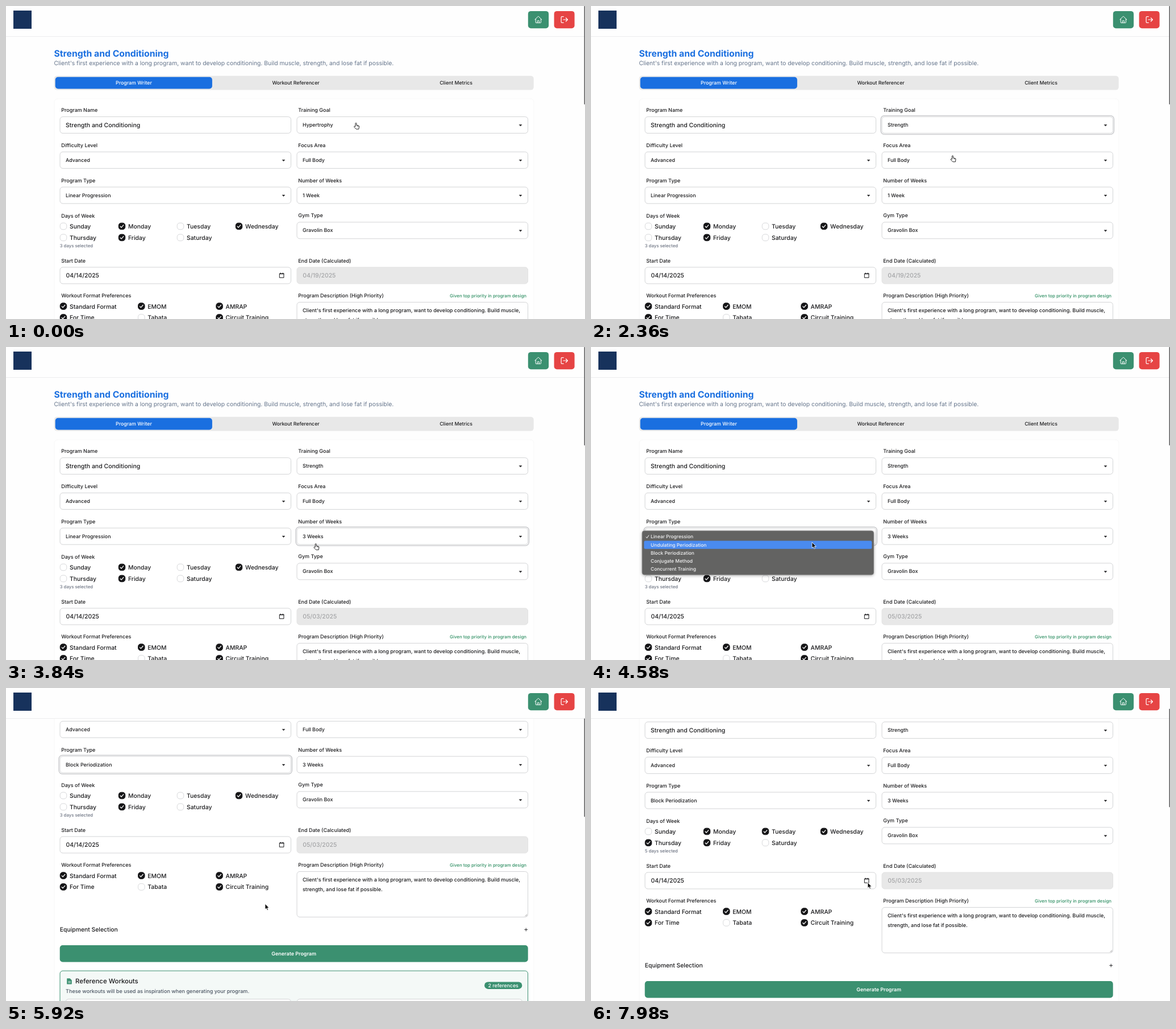
Recreate the animation shown at these times as an HTML page. Size 1019 by 550 pixels, loop 8 s.

```html
<!DOCTYPE html>
<html lang="en">
<head>
<meta charset="utf-8">
<title>Program Writer</title>
<style>
html, body { margin: 0; width: 100%; height: 100%; overflow: hidden; background: #fefefe; }
svg { display: block; width: 100%; height: 100%; font-family: Inter, "Open Sans", sans-serif; font-weight: 450; text-rendering: geometricPrecision; }
.menu { filter: drop-shadow(0 1.5px 2.5px rgba(0, 0, 0, .35)); }
</style>
</head>
<body>
<svg id="stage" viewBox="0 0 1019 550"></svg>
<script>
const LOOP = 8000, STEP = 148;
const INK = '#1b1b1d', LINE = '#d3d4d6', GREEN = '#3b9070', BLUE = '#1a6fe0', GREY = '#6b7280';
const LEFT = 95, RIGHT = 512, WIDTH = 406.5;
const SUMMARY = ["Client's first experience with a long program, want to develop conditioning. Build muscle,",
  'strength, and lose fat if possible.'];
const GOALS = ['Strength', 'Endurance', 'Hypertrophy', 'Power', 'Skill Development', 'Conditioning'];
const WEEKS = ['1 Week', '2 Weeks', '3 Weeks', '4 Weeks', '5 Weeks', '6 Weeks'];
const TYPES = ['Linear Progression', 'Undulating Periodization', 'Block Periodization', 'Conjugate Method', 'Concurrent Training'];
const DAYS = ['Sunday', 'Monday', 'Tuesday', 'Wednesday', 'Thursday', 'Friday', 'Saturday'];
const FORMATS = ['Standard Format', 'EMOM', 'AMRAP', 'For Time', 'Tabata', 'Circuit Training'];

// Keys: step, then values
const CURSOR = [[0, 616, 205.5], [2, 602, 212], [4, 628, 221], [5, 640, 214], [6, 640, 214], [7, 640, 209],
  [9, 639, 206], [11, 633, 189], [13, 634, 180], [14, 634, 180], [15, 634, 200], [17, 639, 326], [18, 639, 326],
  [19, 640, 331], [21, 641, 346.5], [23, 641, 361], [24, 641, 361], [25, 622, 352], [28, 392, 333],
  [31, 389, 343.5], [32, 390, 358], [34, 395, 361], [38, 456, 379], [40, 456, 379.5], [43, 456, 379.5],
  [45, 332, 250], [46, 332, 250], [48, 133, 272], [51, 133, 272], [54, 487, 342]];
const SCROLL = [[0, 0], [38, 0], [39, 80], [40, 198], [41, 198], [42, 160], [43, 138], [44, 135]];
const HAND_SPANS = [[0, 6], [15, 18], [25, 27], [45, 46], [49, 51]];

function sample(keys, step) {
  const i = keys.findIndex(k => k[0] >= step);
  if (i < 0) return keys[keys.length - 1].slice(1);
  if (keys[i][0] === step) return keys[i].slice(1);
  const a = keys[i - 1], b = keys[i], u = (step - a[0]) / (b[0] - a[0]);
  return a.slice(1).map((v, n) => v + (b[n + 1] - v) * u);
}

const text = (x, mid, str, size, fill = INK, extra = '') =>
  `<text x="${x}" y="${mid + size * .36}" font-size="${size}" fill="${fill}" ${extra}>${str}</text>`;
const rect = (x, y, w, h, r, fill, extra = '') =>
  `<rect x="${x}" y="${y}" width="${w}" height="${h}" rx="${r}" fill="${fill}" ${extra}/>`;
const path = (d, stroke, width, fill = 'none') =>
  `<path d="${d}" stroke="${stroke}" stroke-width="${width}" fill="${fill}" stroke-linecap="round" stroke-linejoin="round"/>`;
const move = (x, y, body) => `<g transform="translate(${x} ${y})">${body}</g>`;
const outline = `stroke="${LINE}"`;
const centered = weight => `text-anchor="middle" font-weight="${weight}"`;

const label = (x, y, str) => text(x + 2.2, y, str, 8.97);
const box = (x, y, h = 29) => rect(x, y, WIDTH, h, 5, '#fff', outline);

function select(x, row, name, value, focused) {
  const y = 194.6 + row * 61.75;
  return label(x, y - 11.6, name) + box(x, y) +
    (focused ? rect(x - 2, y - 2, WIDTH + 4, 33, 6.5, 'none', 'stroke="#c6c7ca" stroke-width="1.3"') : '') +
    text(x + 10, y + 14.4, value, 8.9) +
    move(x + 393.6, y + 14, path('M-2.2 0H2.2L0 2.3Z', INK, .5, INK));
}

const checkbox = (x, y, name, on) =>
  rect(x - 5.8, y - 5.8, 11.6, 11.6, 4.6, on ? '#151517' : '#fff', `stroke="${on ? '#151517' : LINE}" stroke-width=".9"`) +
  (on ? move(x, y, path('M-2.8 .3L-.9 2.2L2.8 -2.1', '#fff', 1.3)) : '') +
  text(x + 11, y + .2, name, 10.4);

const checks = (names, perRow, pitch, y, isOn) => names.map((name, i) =>
  checkbox(101 + i % perRow * pitch, y + Math.floor(i / perRow) * 19.9, name, isOn(name))).join('');

function menu(x, y, items, chosen, active) {
  const rows = items.map((item, i) => {
    const mid = y + 10.4 + i * 14.2;
    return (i === active ? rect(x + 3.3, mid - 7.1, 401, 14.2, 2.5, '#4a8bf0') : '') +
      (i === chosen ? move(x + 9.3, mid, path('M-2.2 .5L-.8 2.4L2.3 -2.4', '#fff', 1)) : '') +
      text(x + 15, mid, item, 8.4, '#f4f4f4');
  });
  return '<g class="menu">' + rect(x, y, 407.5, items.length * 14.2 + 6.2, 4, '#636362', 'stroke="#858585" stroke-width=".7"') + '</g>' + rows.join('');
}

function form(step) {
  const days = ['Monday', 'Wednesday', 'Friday'];
  if (step >= 46) days.push('Tuesday');
  if (step >= 51) days.push('Thursday');
  const endDate = step < 25 ? '04/19/2025' : '05/03/2025';
  return rect(85, 163, 844, 900, 6, '#fff', 'stroke="#f8f8f8"') +
    text(84.5, 83, 'Strength and Conditioning', 15.75, BLUE, 'font-weight="700"') +
    text(84.5, 100.5, SUMMARY.join(' '), 10.37, '#64748b', 'font-weight="400"') +
    rect(84.7, 122.8, 844, 24.8, 5, '#e8e8e8') + rect(86.7, 124.8, 276.2, 20.6, 5, BLUE) +
    text(225, 135, 'Program Writer', 8.8, '#fff', centered(450)) +
    text(510, 135, 'Workout Referencer', 8.7, INK, centered(500)) +
    text(792, 135, 'Client Metrics', 8.7, INK, centered(500)) +

    label(LEFT, 183, 'Program Name') + box(LEFT, 194.6) + text(105, 209.2, 'Strength and Conditioning', 10.5) +
    select(RIGHT, 0, 'Training Goal', GOALS[step < 15 ? 2 : 0], step >= 7 && step < 19) +
    select(LEFT, 1, 'Difficulty Level', 'Advanced') + select(RIGHT, 1, 'Focus Area', 'Full Body') +
    select(LEFT, 2, 'Program Type', TYPES[step < 39 ? 0 : 2], step >= 28 && step < 46) +
    select(RIGHT, 2, 'Number of Weeks', WEEKS[step < 25 ? 0 : 2], step >= 19 && step < 28) +
    select(RIGHT, 3, 'Gym Type', 'Gravolin Box') +

    label(LEFT, 368.3, 'Days of Week') + checks(DAYS, 4, 103, 387, d => days.includes(d)) +
    text(94.7, 421.5, days.length + ' days selected', 7.75, GREY) +

    label(LEFT, 447.4, 'Start Date') + box(LEFT, 459) + text(105.5, 473.5, '04/14/2025', 10.45) +
    move(485.3, 473.6, path('M-3.6 -3.4H3.6V3.8H-3.6Z', INK, 1) + path('M-3.6 -2.9H3.6M-2 -4.4V-3M2 -4.4V-3', INK, 1.2)) +
    label(RIGHT, 447.4, 'End Date (Calculated)') + rect(RIGHT, 459, WIDTH, 29, 5, '#e8e8e8', 'stroke="#e2e2e2"') +
    text(522.3, 473.5, endDate, 10.45, '#a3a4a6') +

    label(LEFT, 509, 'Workout Format Preferences') + checks(FORMATS, 3, 137.3, 527.6, f => f !== 'Tabata') +
    label(RIGHT, 509, 'Program Description (High Priority)') +
    text(916, 509, 'Given top priority in program design', 7.85, '#2f8f63', 'text-anchor="end"') +
    box(RIGHT, 520.5, 80) + SUMMARY.map((line, i) => text(522, 534.3 + i * 17.3, line, 9.03)).join('') +
    path('M913.5 599L917 595.5M915.5 599L917 597.5', '#777', .6) +

    text(94.7, 622.5, 'Equipment Selection', 10.4) + path('M912.7 622.6H917.7M915.2 620.1V625.1', INK, .9) +
    rect(94.7, 650, 824, 29.5, 5, GREEN) + text(506.7, 664.6, 'Generate Program', 8.95, '#fff', centered(600)) +

    rect(95, 695, 823.5, 300, 5, '#f4f9f7', `stroke="${GREEN}"`) +
    move(107.5, 708.3, path('M.4 .4H5L7.8 3.2V9.8H.4Z', GREEN, .8, GREEN) + path('M2.2 5.4H6M2.2 7.5H6', '#fff', .8)) +
    text(122, 713.3, 'Reference Workouts', 11.4, INK, 'font-weight="500"') +
    text(105, 730.5, 'These workouts will be used as inspiration when generating your program.', 9.08, '#4b5563') +
    rect(842, 714.5, 66.3, 12.4, 6.2, GREEN) + text(875.2, 720.7, '2 references', 8.85, '#fff', centered(450)) +
    rect(105, 744.7, 396.5, 90, 5, '#fff', outline) + rect(512, 744.7, 396.5, 90, 5, '#fff', outline);
}

function openMenu(step, y) {
  const row = (top, count) => Math.max(0, Math.min(count - 1, Math.floor((y - top - 2.5) / 14.2)));
  if (step >= 7 && step < 15) return menu(507, 171, GOALS, 2, row(171, 6));
  if (step >= 19 && step < 25) return menu(507, 323, WEEKS, 0, row(323, 6));
  if (step >= 28 && step < 35) return menu(90, 323, TYPES, 0, row(323, 5));
  return '';
}

const header = rect(0, 0, 1019, 53.5, 0, '#fefefe') + rect(0, 53, 1019, 1, 0, '#ededee') +
  rect(13, 8, 32, 32, 0, '#17325c') +
  rect(918.8, 8.9, 36.3, 30.4, 5, GREEN) + rect(964.6, 8.9, 36, 30.4, 5, '#e64444') +
  move(936.8, 24, path('M-6 0L-.5 -5.6Q0 -6 .5 -5.6L6 0M-4.6 -1.3V4.9Q-4.6 5.6 -3.9 5.6H3.9Q4.6 5.6 4.6 4.9V-1.3M-1.5 5.5V1.9H1.5V5.5', '#fff', 1)) +
  move(982.7, 24, path('M-1.5 -5.3H-4.2Q-5.6 -5.3 -5.6 -3.9V3.9Q-5.6 5.3 -4.2 5.3H-1.5M-2 0H5.6M2.7 -3L5.7 0L2.7 3', '#fff', 1.2));

const arrow = path('M0 0V9.5L2.2 7.5L3.7 11L5.4 10.3L3.9 7H6.8Z', '#fff', .8, '#000');
const hand = path('M-1.1 6V1a1 1 0 0 1 2 0V4L4.4 4.7Q5.7 5.1 5.5 6.5L4.8 10.8H.3L-3.3 7.1Q-3.7 5.6 -2.3 5.6Z', '#111', .9, '#fff') +
  path('M2.3 4.6V6M4 5V6.2', '#111', .6);

function draw(step) {
  const [x, y] = sample(CURSOR, step), [scroll] = sample(SCROLL, step);
  const isHand = HAND_SPANS.some(([from, to]) => step >= from && step <= to);
  stage.innerHTML = move(0, -scroll, form(step)) + header + openMenu(step, y) +
    rect(1017.5, scroll * .27, 1.5, 173, .7, '#5f5f61') + move(x, y, isHand ? hand : arrow);
}

const stage = document.getElementById('stage');
let shown = -1;
function tick() {
  const step = Math.min(54, Math.floor((performance.now() % LOOP + 12) / STEP));
  if (step !== shown) draw(shown = step);
  requestAnimationFrame(tick);
}
tick();
</script>
</body>
</html>
```
